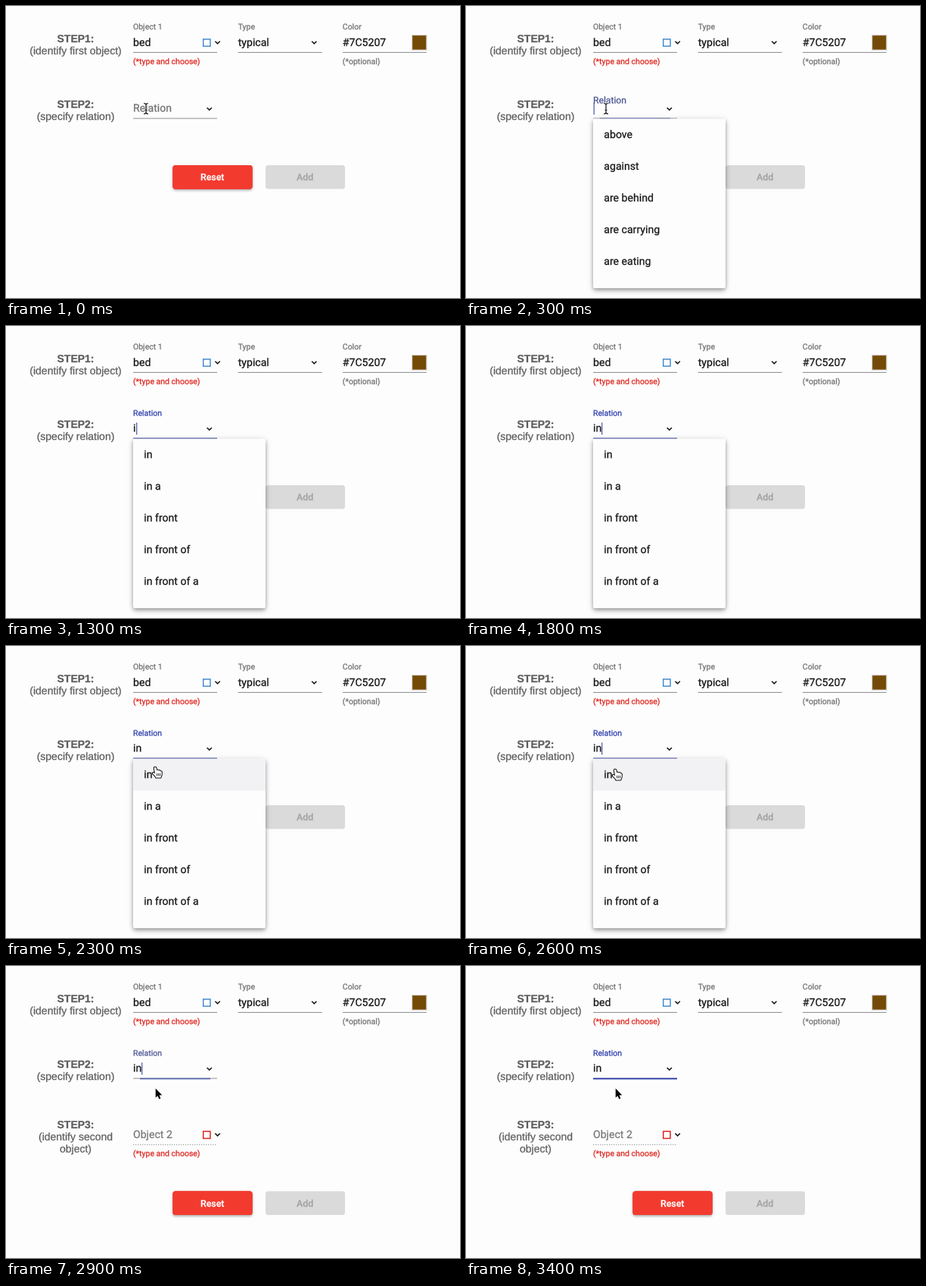
These frames come from a looping animation (600x387 px, 3.6 s). An HTML page with a canvas:

```html
<!DOCTYPE html>
<html lang="en">
<head>
<meta charset="utf-8">
<title>Relation form</title>
<style>
  html, body { margin: 0; width: 100%; height: 100%; overflow: hidden; background: #fefdfe; }
  canvas { display: block; width: 600px; height: 387px; }
</style>
</head>
<body>
<canvas id="stage" width="600" height="387"></canvas>
<script>
const ctx = document.getElementById('stage').getContext('2d');
const LOOP = 3600, TICK = 100;
const UI = 'Roboto, Arial, sans-serif';
const SIDE = '"Liberation Sans", Arial, sans-serif';
const BG = '#fefdfe', INK = '#141415', GREY = [112, 112, 114], BLUE = [44, 62, 172];
const RED = '#dc251d', LINE = '#8f8f91';
const ROW1 = 61, ROW2 = 148.5;
const ALL = ['above', 'against', 'are behind', 'are carrying', 'are eating'];
const MATCHES = ['in', 'in a', 'in front', 'in front of', 'in front of a'];

// Event times in ms
const OPEN = 300, TYPE_I = 1200, FILTER = 1300, TYPE_N = 1500;
const MOVE = 1900, HOVER = 2100, PRESS = 2800, PICK = 2900;

const clamp = v => Math.max(0, Math.min(1, v));
const mix = (a, b, k) => a + (b - a) * k;
const rgb = c => `rgb(${c.map(Math.round).join()})`;
const blend = (a, b, k) => rgb(a.map((v, i) => mix(v, b[i], k)));

// cubic-bezier(.25, .8, .25, 1)
function swift(x) {
  let lo = 0, hi = 1;
  for (let i = 0; i < 20; i++) {
    const s = (lo + hi) / 2, r = 1 - s;
    if (0.75 * s * r * r + 0.75 * s * s * r + s ** 3 < x) lo = s; else hi = s;
  }
  const r = 1 - lo;
  return 2.4 * lo * r * r + 3 * lo * lo * r + lo ** 3;
}

// A hairline stroke gives the text its slightly heavier smoothing
function text(str, x, y, { size = 14.1, color = INK, weight = 400, family = UI, align = 'left' } = {}) {
  ctx.font = `${weight} ${size}px ${family}`;
  ctx.textAlign = align;
  ctx.fillStyle = ctx.strokeStyle = color;
  ctx.lineWidth = 0.25;
  ctx.fillText(str, x, y);
  ctx.strokeText(str, x, y);
}

function rect(x, y, w, h, color) {
  ctx.fillStyle = color;
  ctx.fillRect(x, y, w, h);
}

function card(x, y, w, h, r, color, shadows = []) {
  ctx.beginPath();
  ctx.roundRect(x, y, w, h, r);
  ctx.fillStyle = color;
  for (const [dy, blur, a] of shadows) {
    ctx.save();
    ctx.shadowColor = `rgba(0,0,0,${a})`;
    ctx.shadowOffsetY = dy;
    ctx.shadowBlur = blur;
    ctx.fill();
    ctx.restore();
  }
  ctx.fill();
}

function stroke(points, color, width) {
  ctx.beginPath();
  points.forEach(([x, y]) => ctx.lineTo(x, y));
  ctx.strokeStyle = color;
  ctx.lineWidth = width;
  ctx.stroke();
}

const chevron = (x, y) => stroke([[x - 3.2, y - 1.8], [x, y + 1.4], [x + 3.2, y - 1.8]], '#1c1c1c', 1.6);

function box(x, y, color) {
  ctx.strokeStyle = color;
  ctx.lineWidth = 1.5;
  ctx.strokeRect(x, y, 9.3, 9.3);
}

const small = (str, x, y, color = rgb(GREY)) => text(str, x, y, { size: 10.5, color });

function step(n, y, ...lines) {
  const side = { color: '#5c5c5e', family: SIDE, align: 'center', size: 14 };
  text(`STEP${n}:`, 92, y, { ...side, weight: 700 });
  lines.forEach((s, i) => text(s, 92, y + 16 * (i + 1), side));
}

function firstRow() {
  step(1, 47.7, '(identify first object)');
  [['Object 1', 'bed', 168], ['Type', 'typical', 306.7], ['Color', '#7C5207', 444.8]].forEach(([label, value, x]) => {
    small(label, x, 31.2);
    text(value, x, 53);
    rect(x, ROW1, 111, 1, LINE);
  });
  box(260.7, 44, '#438cd0');
  chevron(279.6, 48.5);
  chevron(407.3, 48.5);
  rect(536, 38, 20.5, 21, '#d6d2ce');
  rect(537.2, 39.2, 18, 18.5, '#744b06');
  small('(*type and choose)', 168, 77.2, RED);
  small('(*optional)', 444.8, 77.2);
}

function caretOn(t) {
  if (t < OPEN || (t >= PRESS && t < PICK)) return false;
  const since = [OPEN, TYPE_I, TYPE_N, PICK].filter(s => s <= t).pop();
  return (t - since) % 1000 < 500;
}

function relation(t) {
  step(2, 135, '(specify relation)');
  rect(168, ROW2, 111, 1, LINE);
  chevron(268.8, 136.5);

  const opened = t >= OPEN, blurred = t >= PRESS && t < PICK;
  const start = t >= PICK ? PICK : OPEN;
  const since = opened && !blurred ? t - start + 70 : 0;
  const tint = swift(clamp(since / 400));
  const up = opened ? swift(clamp((t - OPEN + 70) / 400)) : 0;
  text('Relation', 168, mix(140.3, 119, up), {
    size: mix(14.1, 10.5, up), color: blend(GREY, BLUE, tint)
  });

  if (since) {
    const w = 111 * mix(0.5, 1, swift(clamp(since / 300)));
    ctx.globalAlpha = swift(clamp(since / 300));
    rect(223.5 - w / 2, ROW2, w, 1.8, rgb(BLUE));
    ctx.globalAlpha = 1;
  }
  const value = t >= TYPE_N ? 'in' : t >= TYPE_I ? 'i' : '';
  text(value, 168, 140.3);
  if (caretOn(t)) rect([168.6, 172.2, 179.2][value.length], 128, 1.1, 16, '#3b4796');
}

function secondObject() {
  step(3, 215, '(identify second', 'object)');
  text('Object 2', 168, 228, { color: '#77777a' });
  for (let x = 168; x < 279; x += 3) rect(x, 236.3, 1.3, 1, '#8a8a8c');
  box(260.7, 219.2, RED);
  chevron(279.6, 223.7);
  small('(*type and choose)', 168, 252.2, RED);
}

function buttons(y) {
  const label = { size: 12.4, weight: 500, align: 'center' };
  card(220.5, y, 105, 31.5, 3.5, '#f33a2f', [[2, 3, 0.22], [1, 5, 0.14]]);
  text('Reset', 272.7, y + 20.2, { ...label, color: '#fff' });
  card(343, y, 105, 31.5, 3.5, '#dbdadb');
  text('Add', 395.2, y + 20.2, { ...label, color: '#a4a4a6' });
}

function panel(t) {
  const top = ROW2 + 1.2;
  card(168, top, 175, 224.3, [0, 0, 3.5, 3.5], '#fefdfe', [[2, 4, 0.22], [4, 6, 0.15], [1, 10, 0.13]]);
  if (t >= HOVER) rect(168, top, 175, 42, '#f2f1f3');
  if (t >= PRESS) {
    ctx.save();
    ctx.beginPath();
    ctx.rect(168, top, 175, 42);
    ctx.clip();
    ctx.beginPath();
    ctx.arc(198, 164, 48, 0, 7);
    ctx.fillStyle = '#d6d5d6';
    ctx.fill();
    ctx.restore();
  }
  (t < FILTER ? ALL : MATCHES).forEach((s, i) => text(s, 182.3, 175.3 + 42 * i));
}

function shape(d, x, y, fill, edge, width) {
  const p = new Path2D(d);
  ctx.save();
  ctx.translate(x, y);
  ctx.lineJoin = 'round';
  ctx.strokeStyle = edge;
  ctx.lineWidth = width;
  ctx.stroke(p);
  ctx.fillStyle = fill;
  ctx.fill(p);
  ctx.restore();
}

function beam(x, y) {
  const p = new Path2D('M-3-7Q0-7 0-5Q0-7 3-7M0-5V5M-3 7Q0 7 0 5Q0 7 3 7M-1.5 2H1.5');
  ctx.save();
  ctx.translate(x, y);
  [['#fff', 2.6], ['#111', 1.2]].forEach(([c, w]) => {
    ctx.strokeStyle = c;
    ctx.lineWidth = w;
    ctx.stroke(p);
  });
  ctx.restore();
}

function hand(x, y) {
  shape('M-2.8 1.6L-4.2-4.8Q-4.4-7-3-7Q-1.8-7-1.4-5.4L-.6-2.4Q.4-3.6 1.6-2.4Q2.8-3.2 3.8-1.8' +
    'Q5.6-2.2 5.9 0L5.6 3.6L4.4 7H-1.8L-2.8 5L-6 1.8Q-6.4 .2-5 .2Z', x, y, '#fff', '#111', 2);
  [-0.4, 1.6, 3.6].forEach(dx => stroke([[x + dx, y + 1.2], [x + dx, y + 4.8]], '#222', 0.9));
}

function pointer(t) {
  if (t >= TYPE_I && t < MOVE) return;
  if (t < TYPE_I) return beam(185, 136);
  if (t >= PICK) return shape('M0 0V12.2L2.7 9.7L4.6 14L6.7 13.1L4.8 8.9H8.6Z', 197.7, 162.3, '#000', '#fff', 1.8);
  const k = swift(clamp((t - MOVE) / 400));
  const x = mix(187, 200, k), y = mix(138, 167.5, k);
  if (t < HOVER) beam(x, y);
  else hand(x, y + 3 * clamp((t - 2300) / 300));
}

function draw(t) {
  rect(0, 0, 600, 387, BG);
  firstRow();
  const picked = t >= PICK;
  buttons(picked ? 298.5 : 211);
  relation(t);
  if (picked) secondObject();
  else if (t >= OPEN) panel(t);
  pointer(t);
}

function loop(now) {
  draw(Math.floor((now % LOOP) / TICK) * TICK);
  requestAnimationFrame(loop);
}

ctx.textRendering = 'geometricPrecision';
draw(0);
requestAnimationFrame(loop);
</script>
</body>
</html>
```
